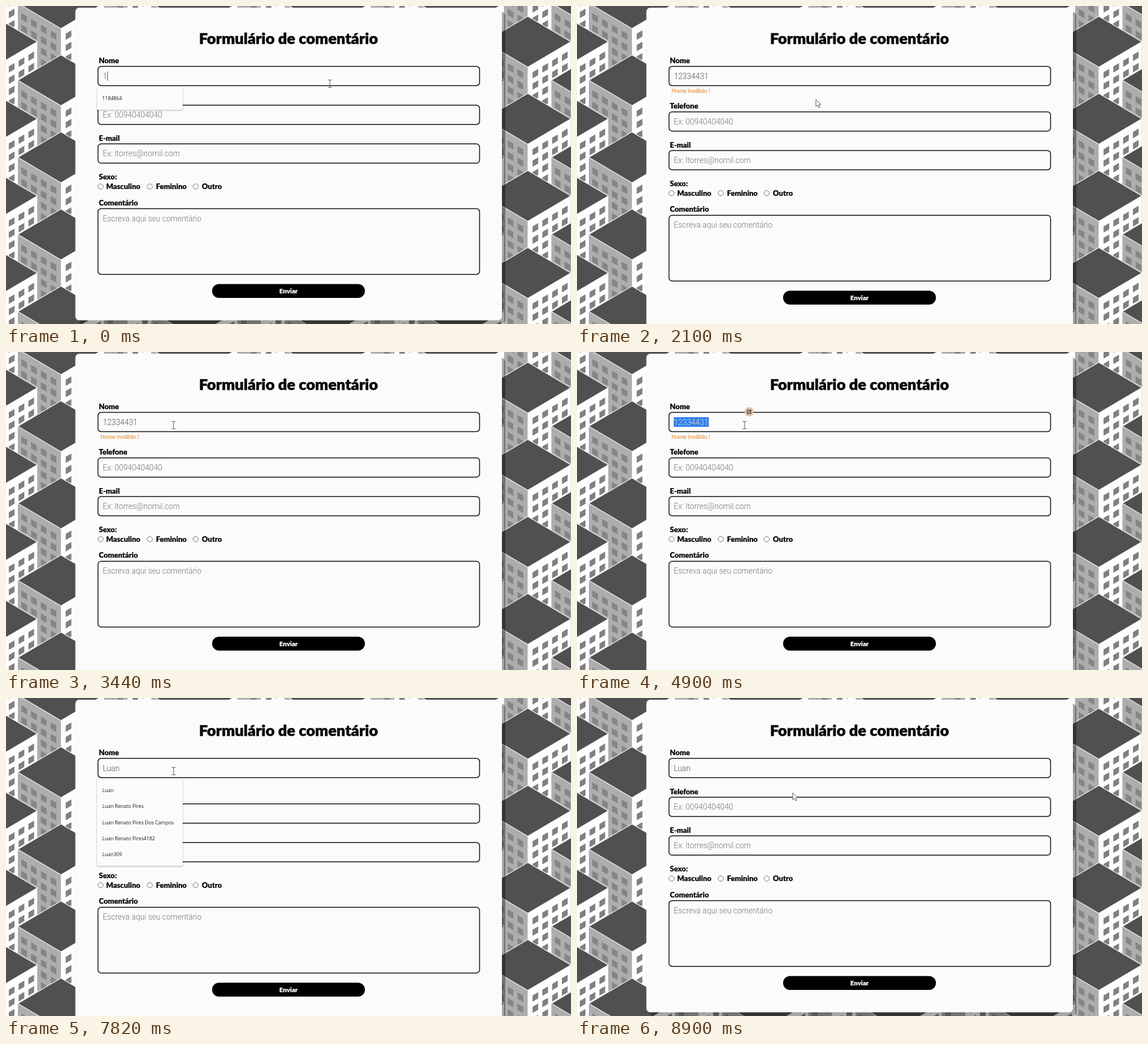
Animation, 998 px wide and 561 px high, one loop 8980 ms. Source, as an HTML page:

```html
<!DOCTYPE html>
<html lang="pt">
<head>
<meta charset="utf-8">
<title>Formulário de comentário</title>
<style>
  html, body { margin: 0; width: 100%; height: 100%; overflow: hidden; background: #fff; }
  svg { display: block; width: 998px; height: 561px; }
  .bold { font-family: Lato, sans-serif; font-weight: 900; fill: #0a0a0a; stroke: #0a0a0a; stroke-width: .2; stroke-linejoin: round; }
  .label { font-size: 13px; }
  .title { font-size: 27.2px; stroke-width: .6; }
  .send { font-size: 11.5px; fill: #fff; stroke: #fff; }
  .field { font: 300 13.8px Roboto, sans-serif; fill: #757575; }
  .box { fill: #fbfbfb; stroke: #0c0c0c; stroke-width: 1.5; }
  .radio { fill: #fff; stroke: #707070; }
  .item { font: 8.7px "Open Sans", sans-serif; fill: #1c1c1c; }
  .error { font: 9.9px Lato, sans-serif; fill: #f8d9b6; stroke: #e9a35c; stroke-width: .55; }
  #menuBox { fill: #fbfbfb; filter: drop-shadow(0 1.5px 1.5px rgba(0,0,0,.3)); }
</style>
</head>
<body>
<svg viewBox="0 0 998 561" xmlns="http://www.w3.org/2000/svg">
  <defs>
    <g id="tower"></g>
    <g id="lower"></g>
    <clipPath id="patch"><rect x="158" y="143" width="157" height="157"/></clipPath>
  </defs>
  <rect width="998" height="561" fill="#fdfdfd"/>
  <g id="city"></g>
  <rect id="shade" x="129" y="10" width="753" rx="8" fill="#000" opacity=".35"/>
  <rect id="panel" x="122.500" y="3" width="753.500" rx="7" fill="#fbfbfb"/>
  <text class="bold title" x="499" y="67" text-anchor="middle">Formulário de comentário</text>
  <text class="bold label" x="164" y="101">Nome</text>
  <rect class="box" x="162.500" y="106.500" width="674" height="34" rx="5.500"/>
  <rect id="mark" x="171" y="115" height="17" fill="#2f7fee"/>
  <text id="name" class="field" x="171" y="129"></text>
  <rect id="caret" y="115.500" width="1" height="16.500" fill="#555"/>
  <use id="form" href="#lower"/>
  <text id="error" class="error" x="167" y="153">Nome Inválido !</text>
  <g id="stale" clip-path="url(#patch)">
    <rect x="158" y="143" width="157" height="157" fill="#fbfbfb"/>
    <use href="#lower"/>
  </g>
  <g id="menu"><rect id="menuBox" x="161" y="142" width="151" rx="1.500"/><g id="items"></g></g>
  <g id="badge">
    <circle r="8" fill="#dcc0aa"/>
    <path d="M0-3H-3V3H3V0M-.8.800L3-3M.8-3H3V-.8" fill="none" stroke="#2b2420" stroke-width="1.200"/>
  </g>
  <path id="arrow" d="M0 0V12.500L2.900 9.800L5 14.300L7 13.400L5 9H9Z" fill="#fff" stroke="#444" stroke-width=".9"/>
  <path id="beam" d="M-3.500-6.500H-1Q0-6.500 0-5.500Q0-6.500 1-6.500H3.500M0-5.500V5.500M-3.500 6.500H-1Q0 6.500 0 5.500Q0 6.500 1 6.500H3.500" fill="none" stroke="#555"/>
</svg>
<script>
const LOOP = 8980, GROW = 11.7;
const $ = id => document.getElementById(id);
const show = (el, on) => el.style.display = on ? '' : 'none';
const set = (el, attrs) => { for (const k in attrs) el.setAttribute(k, attrs[k]); };
const at = (x, y) => `translate(${x} ${y})`;
const clamp = v => Math.max(0, Math.min(1, v));
const ease = v => v * v * (3 - 2 * v);

// Isometric city
function buildCity() {
  const W = 76, H = 44.8, slope = H / W;
  const panes = x0 => {
    let s = '';
    for (let c = 0; c < 4; c++)
      for (let r = 0; r < 6; r++)
        s += `<rect x="${x0 + 17.3 * c}" y="${14 + 20 * r}" width="10" height="11"/>`;
    return s;
  };
  $('tower').innerHTML =
    `<path d="M0 ${H}L${-W} 0V150L0 194Z" fill="#adadad"/>
     <path d="M0 ${H}L${W} 0V150L0 194Z" fill="#fdfdfd"/>
     <g fill="#858585" transform="matrix(1 ${slope} 0 1 ${-W} 0)">${panes(6)}</g>
     <g fill="#808080" transform="matrix(1 ${-slope} 0 1 0 ${H})">${panes(8.5)}</g>
     <path d="M0 ${-H}L${W} 0L0 ${H}L${-W} 0Z" fill="#505050" stroke="#f6f6f6" stroke-width="1.2"/>`;
  let out = '';
  for (let row = -5; row <= 9; row++)
    for (let col = -2; col <= 9; col++)
      if ((row + col) % 2 === 0)
        out += `<use href="#tower" x="${97 + 117.8 * col}" y="${131 + 68 * row}"/>`;
  $('city').innerHTML = out;
}

// Everything under the first field moves as one block
function buildForm() {
  const label = (x, y, s) => `<text class="bold label" x="${x}" y="${y}">${s}</text>`;
  const box = (y, h, hint) =>
    `<rect class="box" x="162.5" y="${y}" width="674" height="${h}" rx="5.5"/>
     <text class="field" x="171" y="${y + 22}">${hint}</text>`;
  const radio = (x, tx, s) => `<circle class="radio" cx="${x}" cy="318.5" r="4.6"/>` + label(tx, 323, s);
  $('lower').innerHTML =
    label(164, 169.5, 'Telefone') + box(175, 34, 'Ex: 00940404040') +
    label(164, 238, 'E-mail') + box(243.3, 34, 'Ex: ltorres@nomil.com') +
    label(164, 306, 'Sexo:') +
    radio(167, 177, 'Masculino') + radio(254, 265, 'Feminino') + radio(335, 346, 'Outro') +
    label(164, 351.5, 'Comentário') + box(357.5, 116, 'Escreva aqui seu comentário') +
    `<rect x="364" y="490.5" width="270" height="24.5" rx="12.2" fill="#000"/>
     <text class="bold send" x="499" y="507" text-anchor="middle">Enviar</text>`;
}

const typed = [
  [0, '1'], [80, '12'], [240, '123'], [400, '1233'], [600, '12334'], [800, '123344'],
  [1220, '1233443'], [1360, '12334431'], [5420, ''], [5900, 'L'], [6180, 'Lu'],
  [6640, 'Lua'], [7200, 'Luan']
];
const people = ['Luan', 'luzi3', 'Luan Renato Pires', 'Luan Renato Pires Dos Campos',
  'Luan Renato Pires4182', 'Luan309'];

// Pointer path: time, x, y
const path = [
  [0, 572, 137], [1260, 572, 137], [1400, 500, 186], [1520, 436, 160], [1660, 436, 160],
  [2100, 422, 165], [2540, 405, 178], [2740, 384, 196], [3040, 316, 150], [3240, 288, 131],
  [3440, 296, 129], [8200, 296, 129], [8340, 354, 160], [8460, 385, 168], [8900, 381, 167],
  [LOOP, 381, 167]
];

function pointer(t) {
  let i = 0;
  while (i < path.length - 2 && t >= path[i + 1][0]) i++;
  const [t0, x0, y0] = path[i], [t1, x1, y1] = path[i + 1];
  const k = ease(clamp((t - t0) / (t1 - t0)));
  return [x0 + (x1 - x0) * k, y0 + (y1 - y0) * k];
}

function options(t) {
  if (t < 100) return ['1184864'];
  if (t < 5900 || t >= 8440) return [];
  return t < 6900 ? people : people.filter(p => p !== 'luzi3');
}

let listed = '';
function drawMenu(list) {
  show($('menu'), list.length);
  const key = list.join();
  if (!list.length || key === listed) return;
  listed = key;
  set($('menuBox'), { height: 12.6 + 28.3 * list.length });
  $('items').innerHTML = list.map((s, i) =>
    `<text class="item" x="170" y="${166 + 28.3 * i}">${s}</text>`).join('');
}

function draw(t) {
  const grown = t >= 1660 && t < 8500;
  const selected = t >= 3920 && t < 5420;
  const shift = grown ? GROW : 0;

  set($('panel'), { height: 551.5 + shift });
  set($('shade'), { height: 551.5 + shift });
  set($('form'), { transform: at(0, shift) });
  show($('error'), grown && t < 8440);
  show($('stale'), t >= 8440 && grown);
  drawMenu(options(t));

  const name = $('name');
  const text = typed.filter(k => k[0] <= t).pop()[1];
  if (name.textContent !== text) name.textContent = text;
  const width = text ? name.getComputedTextLength() : 0;
  name.style.fill = selected ? '#e6dccb' : '#555';
  show($('mark'), selected);
  set($('mark'), { width: width + .5 });
  show($('caret'), t < 1500 || (t >= 3780 && t < 3920) || (t >= 5420 && t < 7820));
  set($('caret'), { x: 171.3 + width });

  const pop = ease(clamp((t - 3960) / 580));
  show($('badge'), selected && pop > 0);
  set($('badge'), { transform: at(304, 105.5) + ` scale(${.6 + .4 * pop})`, opacity: pop });

  const [x, y] = pointer(t);
  const inField = (y >= 106 && y <= 141) || (y >= 175 + shift && y <= 209 + shift);
  show($('beam'), inField);
  show($('arrow'), !inField);
  set($(inField ? 'beam' : 'arrow'), { transform: at(x, y) });
}

buildCity();
buildForm();
const start = performance.now();
function tick() {
  draw((performance.now() - start) % LOOP);
  requestAnimationFrame(tick);
}
tick();
</script>
</body>
</html>
```
